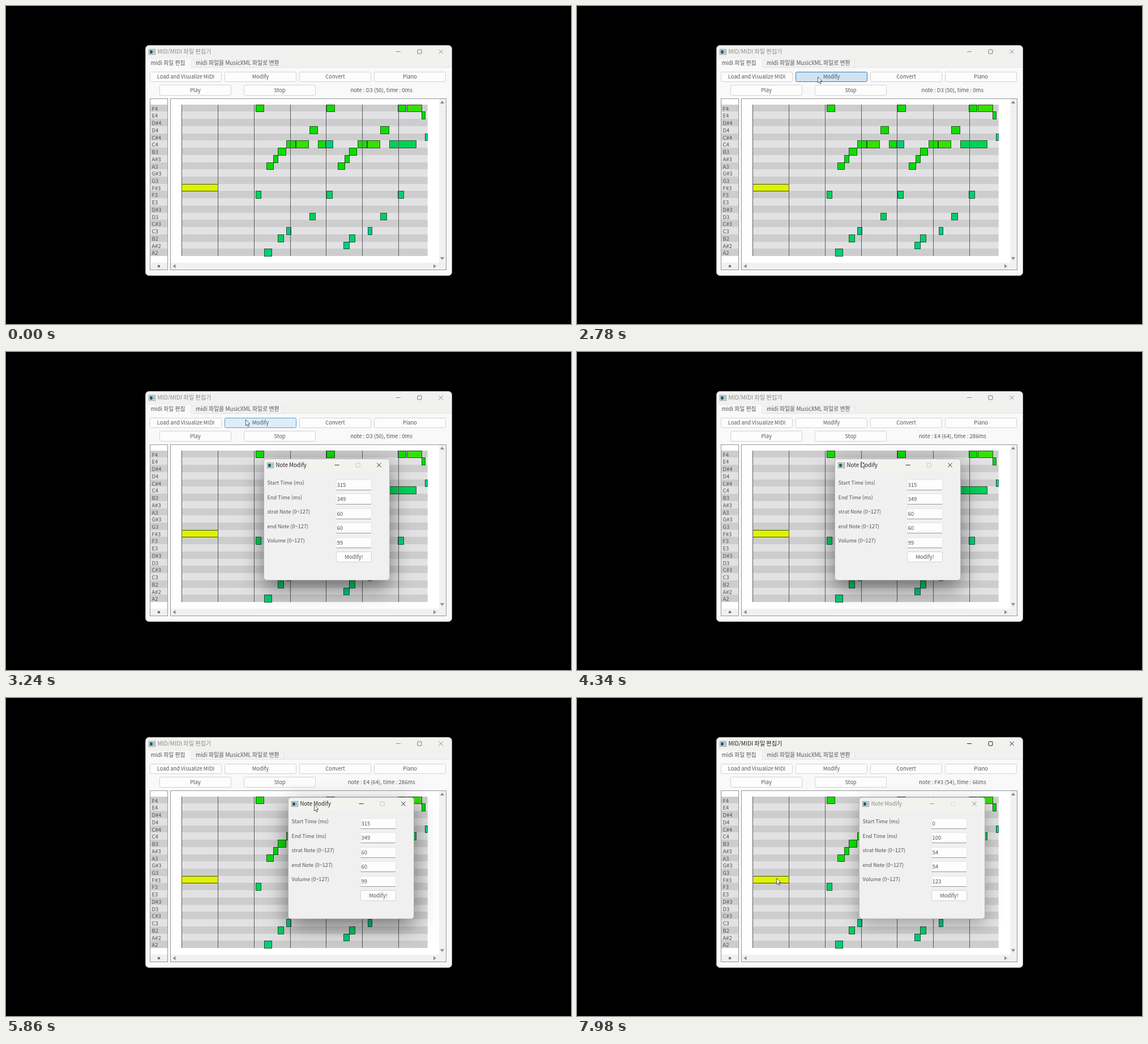
Recreate the animation shown at these times as an HTML page with a canvas. Size 998x561 px, loop 8000 ms.

```html
<!DOCTYPE html>
<html lang="ko">
<head>
<meta charset="utf-8">
<title>MIDI editor</title>
<style>
  html, body { margin: 0; width: 100%; height: 100%; overflow: hidden; background: #000; }
  canvas { display: block; width: 998px; height: 561px; }
</style>
</head>
<body>
<canvas id="stage" width="998" height="561"></canvas>
<script>
const ctx = document.getElementById('stage').getContext('2d');
const LOOP = 8000;
const FONT = '"Noto Sans CJK KR", "Noto Sans CJK", "Noto Sans", sans-serif';
const INK = '#545454';
const NAMES = ['C', 'C#', 'D', 'D#', 'E', 'F', 'F#', 'G', 'G#', 'A', 'A#', 'B'];
const GRID = { x: 310.3, y: 173.6, right: 744.7, row: 12.74, rows: 21, top: 65, bar: 63.85 };

// Moments at which the interface reacts
const T = { show: 780, press: 2740, release: 2860, open: 2950, enterGrid: 4006,
  enterDialog: 4250, grab: 4850, drop: 5725, leaveDialog: 5945, pick: 7400 };

// Pointer moves: start, end, and where it comes to rest
const HOME = [209, 36];
const MOVES = [
  [T.show, 1400, 422, 112], [1700, 2600, 425.5, 125], [2900, 3200, 423.5, 119.5],
  [3700, T.enterDialog, 493, 187.3], [T.enterDialog, 4500, 508.5, 197.5],
  [T.grab, T.drop, 551.2, 184.1], [5850, 6500, 354.5, 324], [6800, 7200, 352.5, 318]
];

const noteName = n => NAMES[n % 12] + (Math.floor(n / 12) - 1);
const snap = v => Math.round(v) + 0.5;
const rowY = i => Math.round(GRID.y + i * GRID.row);

// Notes are [name, start ms, length ms]; the phrase returns every PHRASE ms
const PHRASE = 197;
const MELODY = [['F4', 204, 22], ['A3', 235, 18], ['A#3', 254, 12], ['B3', 266, 21],
  ['C4', 290, 25], ['C4', 316, 34], ['D4', 353, 22]];
const BASS = [['F3', 204, 15], ['B2', 266, 16], ['D3', 353, 16]];
const ENDINGS = [['C4', 377, 21], ['F4', 623, 41], ['E4', 663, 10]];
const FILLS = [['A2', 228, 20], ['C3', 290, 12], ['C4', 399, 19], ['A#2', 447, 16],
  ['C3', 515, 11], ['C4', 575, 73], ['C#4', 673, 7]];

const notes = [];
function addNotes(list, hue, offset = 0) {
  for (const [name, start, length] of list)
    notes.push({ name, start: start + offset, length, hue: hue - Math.min(length, 34) * 0.8 });
}
addNotes([['F#3', 0, 100]], 91);
addNotes(FILLS, 172);
for (let k = 0; k < 3; k++) {
  const part = k < 2 ? undefined : 1; // the last phrase breaks off after its first beat
  addNotes(MELODY.slice(0, part), 133, k * PHRASE);
  addNotes(BASS.slice(0, part), 160 + k * 4, k * PHRASE);
}
addNotes(ENDINGS, 133);

function pointer(t) {
  return MOVES.reduce(([x, y], [start, end, tx, ty]) => {
    const u = Math.min(1, Math.max(0, (t - start) / (end - start)));
    const k = 1 - (1 - u) ** 2;
    return [x + (tx - x) * k, y + (ty - y) * k];
  }, HOME);
}

function rect(x, y, w, h, fill, stroke) {
  if (fill) { ctx.fillStyle = fill; ctx.fillRect(x, y, w, h); }
  if (stroke) { ctx.strokeStyle = stroke; ctx.strokeRect(x, y, w, h); }
}

function round(x, y, w, h, r, fill, stroke) {
  ctx.beginPath();
  ctx.roundRect(x, y, w, h, r);
  if (fill) { ctx.fillStyle = fill; ctx.fill(); }
  if (stroke) { ctx.strokeStyle = stroke; ctx.stroke(); }
}

function line(color, x0, y0, x1, y1) {
  ctx.strokeStyle = color;
  ctx.beginPath();
  ctx.moveTo(x0, y0);
  ctx.lineTo(x1, y1);
  ctx.stroke();
}

function arrow(x, y, turns) {
  ctx.save();
  ctx.translate(x, y);
  ctx.rotate(turns * Math.PI / 2);
  ctx.beginPath();
  ctx.moveTo(-3.5, 2.5);
  ctx.lineTo(0, -2.5);
  ctx.lineTo(3.5, 2.5);
  ctx.fillStyle = '#8c8c8c';
  ctx.fill();
  ctx.restore();
}

function text(s, x, y, size = 9.5, color = INK, align = 'left') {
  ctx.font = `${size}px ${FONT}`;
  ctx.textAlign = align;
  ctx.fillStyle = color;
  ctx.fillText(s, x, y + size * 0.36);
}

function button(label, x, y, w, h, fill = '#fdfdfd', border = '#d2d2d4') {
  round(x, y, w, h, 2, fill, border);
  text(label, x + w / 2, y + h / 2, 9.3, INK, 'center');
}

function appIcon(x, y) {
  rect(x + 0.5, y + 0.5, 11, 9, '#f4f8f8', '#8a9294');
  rect(x + 2, y + 2, 5, 6, '#28606c');
  rect(x + 8, y + 2, 2, 6, '#7fb0b4');
}

// Minimise, maximise and close marks; step is the distance between them
function windowMarks(x, y, step, [min, max, close]) {
  line(min, x - 4, y, x + 4, y);
  round(x + step - 3.5, y - 3.5, 7, 7, 1, null, max);
  const c = x + step * 2, r = 3.7;
  line(close, c - r, y - r, c + r, y + r);
  line(close, c - r, y + r, c + r, y - r);
}

function drawGrid() {
  const { x, right, rows, top, bar } = GRID;
  rect(254.5, 163.5, 31, 302, '#fff', '#94969c');
  rect(255, 452.5, 30, 12.5, '#f0f0f1');
  rect(268, 457, 4, 4, '#777');
  rect(290.5, 163.5, 487, 302, '#fff', '#94969c');
  rect(765, 164, 12, 301, '#f1f1f2');
  rect(291, 453, 486, 12, '#f1f1f2');
  arrow(770.5, 169.5, 0);
  arrow(757.5, 459, 1);
  arrow(770.5, 445.5, 2);
  arrow(297, 459, 3);

  for (let i = 0; i < rows; i++) {
    const y = rowY(i), h = rowY(i + 1) - y, fill = i % 2 ? '#e2e2e4' : '#cdcdce';
    rect(255, y, 30, h, fill);
    rect(x, y, right - x, h, fill);
    text(noteName(top - i), 257.5, y + 7.3);
  }
  ctx.save();
  ctx.beginPath();
  ctx.rect(x - 1, 164, right - x + 1, 288);
  ctx.clip();
  for (const { name, start, length, hue } of notes) {
    const octave = +name.slice(-1), row = top - 12 * (octave + 1) - NAMES.indexOf(name.slice(0, -1));
    const left = snap(x + start * bar / 100), end = snap(x + (start + length) * bar / 100);
    rect(left, rowY(row) + 0.5, end - left, rowY(row + 1) - rowY(row),
      `hsl(${hue} 100% ${52 - hue * 0.075}%)`, 'rgba(0,40,0,.75)');
  }
  for (let i = 0; i < 7; i++) {
    const barX = snap(310 + i * bar);
    line('#58585c', barX, rowY(0), barX, rowY(rows));
  }
  ctx.restore();
}

// The read-out follows the pointer over the grid and holds while the dialog covers it
function status(t) {
  let note = 50, ms = 0;
  if (t >= T.enterGrid) {
    const [x, y] = pointer(t < T.leaveDialog ? Math.min(t, T.enterDialog) : t);
    note = GRID.top - Math.floor((y - GRID.y) / GRID.row);
    ms = Math.round((x - GRID.x) / GRID.bar * 100);
  }
  return `note : ${noteName(note)} (${note}), time : ${ms}ms`;
}

function drawMain(t) {
  const active = t >= T.pick || (t >= T.release && t < T.open);
  const ink = active ? '#222' : '#8c8c8c';
  round(246.5, 69.5, 541, 406, 6, '#f1f1ef', '#b4b5b9');
  round(247, 108, 540, 367, [0, 0, 5, 5], '#f9f9fa');
  rect(327, 95.5, 164, 12.5, '#f2f2f3', '#e6e6e8');
  rect(248.5, 93.5, 78, 15, '#f9f9fa');
  line('#e2e2e4', 327, 108, 787, 108);

  appIcon(252, 76);
  text('MID/MIDI 파일 편집기', 267.5, 80.5, 10.2, ink);
  windowMarks(693, 80.5, 37.5, [ink, active ? '#222' : '#777', ink]);
  text('midi 파일 편집', 255.5, 100.5, 9.8);
  text('midi 파일을 MusicXML 파일로 변환', 335, 100.5, 9.9);

  const [, py] = pointer(t);
  const hover = t < T.enterGrid && py > 116.5 && py < 134;
  const pressed = t >= T.press && t < T.release;
  ['Load and Visualize MIDI', 'Modify', 'Convert', 'Piano'].forEach((label, i) => {
    const look = i === 1 && hover ? (pressed ? ['#cfe3f3', '#3f7fb2'] : ['#deedf8', '#5a9fd4']) : [];
    button(label, 254.5 + i * 132, 116.5, 126, 17, ...look);
  });
  button('Play', 271.5, 139.5, 126, 18);
  button('Stop', 420.5, 139.5, 126, 18);
  text(status(t), 663.3, 149, 9.6, INK, 'center');
  drawGrid();
}

function drawDialog(t) {
  if (t < T.open) return;
  const grab = pointer(T.grab), now = pointer(Math.min(Math.max(t, T.grab), T.drop));
  const appear = Math.min(1, (t - T.open) / 180), scale = 0.9 + 0.1 * appear;
  const active = t < T.pick;

  ctx.save();
  ctx.globalAlpha = appear;
  ctx.translate(Math.round(455 + now[0] - grab[0]), Math.round(188 + now[1] - grab[1]));
  ctx.translate(111, 107);
  ctx.scale(scale, scale);
  ctx.translate(-111, -107);

  ctx.save();
  ctx.shadowColor = `rgba(0,0,0,${active ? 0.5 : 0.3})`;
  ctx.shadowBlur = active ? 38 : 30;
  ctx.shadowOffsetY = active ? 13 : 9;
  round(0.5, 0.5, 222, 214, 5, '#f0f0f0');
  ctx.restore();
  round(0.5, 0.5, 222, 214, 5, '#f0f0f0', '#b4b4b6');
  round(1, 1, 221, 22, [5, 5, 0, 0], '#f2f2ef');

  appIcon(6, 7);
  text('Note Modify', 21.5, 12, 9.7, active ? '#222' : '#8c8c8c');
  windowMarks(129.5, 11.5, 37.2, active ? ['#333', '#c4c4c4', '#222'] : ['#999', '#dedede', '#888']);

  const values = active ? [315, 349, 60, 60, 99] : [0, 100, 54, 54, 123];
  ['Start Time (ms)', 'End Time (ms)', 'strat Note (0~127)', 'end Note (0~127)', 'Volume (0~127)']
    .forEach((label, i) => {
      const y = i * 25.5, base = Math.floor(55 + y) + 0.5;
      text(label, 6.5, 43 + y, 9.2);
      round(128, base - 18, 62.5, 18, 2, '#fdfdfd', '#e6e6e6');
      line('#989898', 128.5, base, 190, base);
      text(values[i], 129.5, 46.5 + y);
    });
  button('Modify!', 128.5, 164.5, 62, 18);
  ctx.restore();
}

function drawPointer(t) {
  if (t < T.show) return;
  ctx.save();
  ctx.translate(...pointer(t));
  ctx.lineWidth = 0.9;
  ctx.lineJoin = 'round';
  const arrowShape = new Path2D('M0 0V10.5L2.4 8.3 4.1 12.2 5.8 11.4 4.1 7.7 7.4 7.5Z');
  ctx.fillStyle = '#fff';
  ctx.fill(arrowShape);
  ctx.strokeStyle = '#444';
  ctx.stroke(arrowShape);
  ctx.restore();
}

function frame() {
  const t = performance.now() % LOOP;
  ctx.lineWidth = 1;
  rect(0, 0, 998, 561, '#000');
  drawMain(t);
  drawDialog(t);
  drawPointer(t);
  requestAnimationFrame(frame);
}
frame();
</script>
</body>
</html>
```
